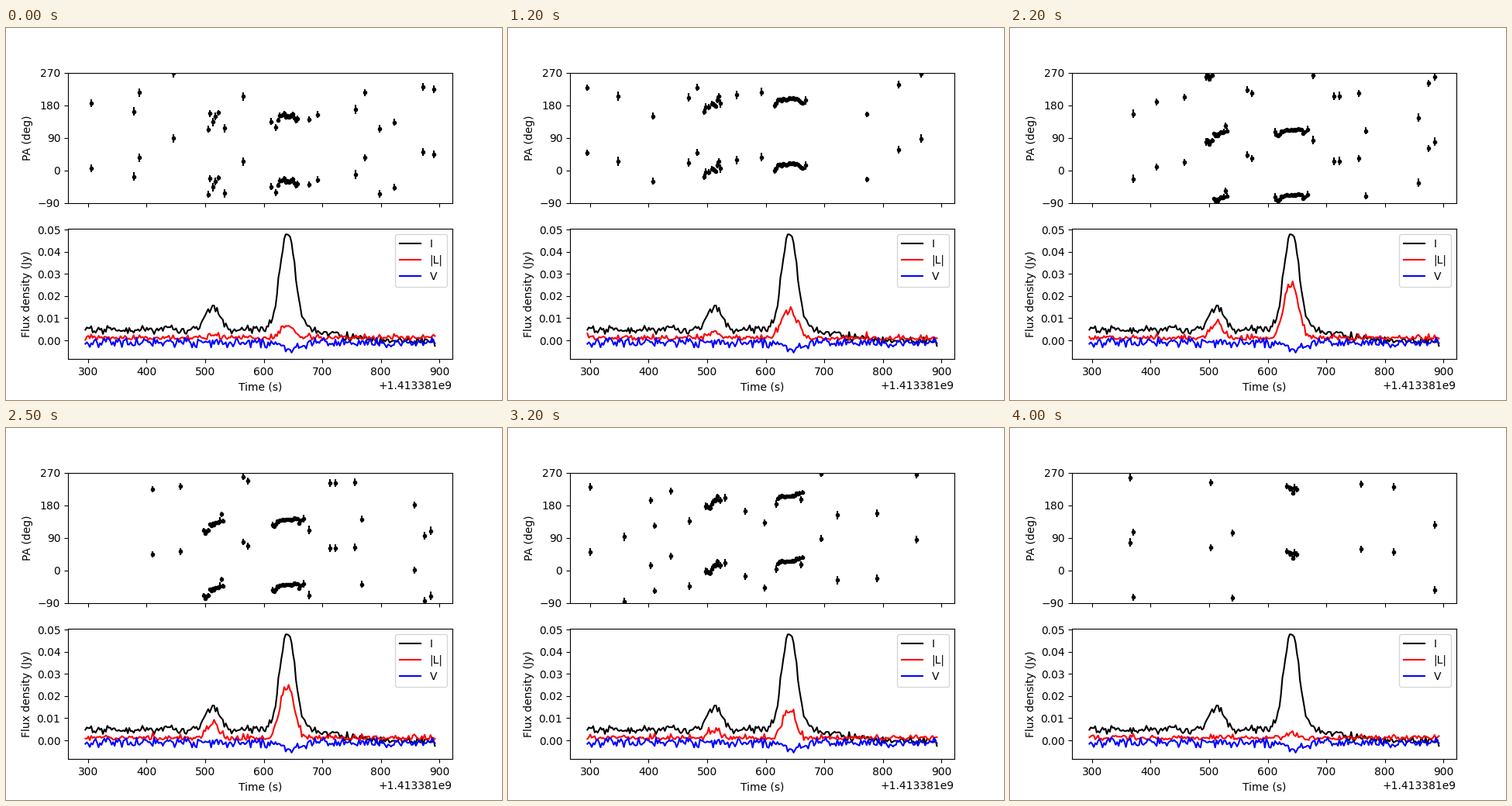
These frames come from a looping animation (640x480 px, 4.1 s). A matplotlib script:

```python
import numpy as np
import matplotlib.pyplot as plt
from matplotlib.animation import FuncAnimation
from matplotlib.collections import LineCollection

FRAMES, STEP_MS = 41, 100
EPOCH = 1413381000     # seconds, shown as the axis offset
SIGMA = 0.00096        # noise of each Stokes parameter (Jy)
CUT = 0.0023           # angles are shown above this polarised flux
BEST = 22              # frame with the strongest polarised signal
WIDTH = 17.5           # frames from the best one to the first null

rng = np.random.default_rng(12)
t = np.linspace(295.4, 892.3, 240)


def bump(centre, width, power=2):
    return np.exp(-0.5 * np.abs((t - centre) / width) ** power)


def jitter(level):
    return level * np.clip(rng.normal(size=t.size), -2, 2)


def phasor(degrees):
    return np.exp(2j * np.radians(degrees))


# Two pulses on a baseline that drops after the second one
base = 0.0048 - 0.0053 / (1 + np.exp((735 - t) / 28))
small = 0.0105 * bump(513, 12)
large = 0.0395 * bump(640.5, 13.2, 2.3)
wings = 0.004 * bump(645, 22)
total = base + small + large + wings + jitter(0.001)
total = np.minimum(total, 0.0478)
circ = -0.001 - 0.0028 * bump(645, 16) + jitter(0.0011)

# Linear polarisation of the pulses; u runs across the large one
pulse = 0.7 * small + 0.63 * large
first = t < 570
u = np.where(first, 0, np.clip((t - 640) / 26, -1.3, 1.3))

# Receiver noise, limited to the same frequency band as the signal
rates = np.linspace(-1, 1, 16) * np.pi / WIDTH
parts = rng.normal(0, SIGMA / 4, (2, t.size, rates.size))
parts = parts[0] + 1j * parts[1]


def polarisation(f):
    """Complex linear polarisation of every sample at frame f."""
    x = (f - BEST + 3 * u ** 2) / WIDTH
    gain = np.sinc(x) - 0.1j * x ** 3
    slope = np.where(u < 0, -16, 1.2 * (f - 26)) * u ** 2
    tilt = np.where(first, np.clip(1.1 * (t - 514) - 12, -40, 5), slope)
    signal = pulse * gain * phasor(112 + 9.4 * (f - BEST) + tilt)
    noise = parts @ np.exp(1j * rates * f) * phasor(10.8 * f)
    return signal + noise


fig, (top, low) = plt.subplots(2, 1, sharex=True, figsize=(6.4, 4.8), dpi=100)
x_data = EPOCH + t

dots, = top.plot([], [], "k.")
bars = LineCollection([], colors="k", linewidths=1.5)
top.add_collection(bars, autolim=False)
top.set_ylim(-90, 270)
top.set_yticks(range(-90, 271, 90))
top.set_ylabel("PA (deg)")

low.plot(x_data, total, "k", label="I")
linear, = low.plot(x_data, 0 * t, "r", label="|L|")
low.plot(x_data, circ, "b", label="V")
low.set_xlim(EPOCH + 265.73, EPOCH + 922.23)
low.set_ylim(-0.008425, 0.050284)
low.set_xlabel("Time (s)")
low.set_ylabel("Flux density (Jy)")
low.legend(loc="upper right")


def update(f):
    p = polarisation(f)
    flux = np.abs(p)
    linear.set_ydata(flux)
    seen = flux > CUT
    angle = np.degrees(np.angle(p[seen])) / 2
    error = np.degrees(0.5 * SIGMA / flux[seen])
    # Every angle is drawn twice, half a turn apart
    px = np.tile(x_data[seen], 2)
    py = np.concatenate([angle, angle + 180])
    err = np.tile(error, 2)
    dots.set_data(px, py)
    bars.set_segments([[(a, b - e), (a, b + e)]
                       for a, b, e in zip(px, py, err)])
    return linear, dots, bars


anim = FuncAnimation(fig, update, frames=FRAMES, interval=STEP_MS,
                     repeat=True, repeat_delay=0)
plt.show()
```
